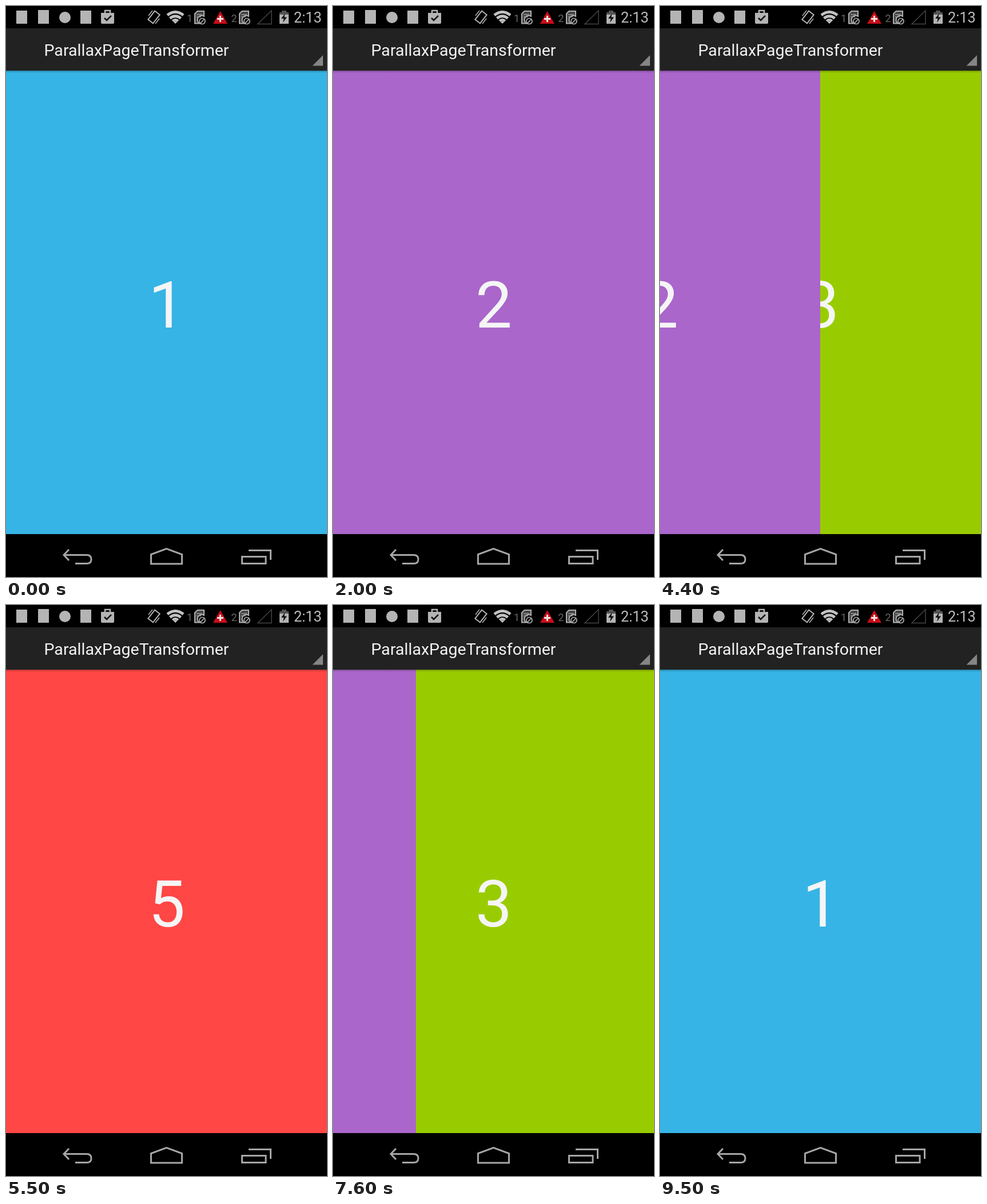
Recreate the animation shown at these times as an HTML page. Size 561x998 px, loop 9700 ms.

```html
<!DOCTYPE html>
<html lang="en">
<head>
<meta charset="utf-8">
<title>Parallax pager</title>
<style>
html, body { margin: 0; width: 100%; height: 100%; overflow: hidden; background: #000; }
svg { display: block; }
text { font-family: Roboto, "Open Sans", sans-serif; }
.digit { font-size: 114px; fill: #f5f5f5; text-anchor: middle; }
.line { fill: none; stroke: #a6a6a6; stroke-width: 3; }
</style>
</head>
<body>
<svg id="stage" width="561" height="998" viewBox="0 0 561 998">
  <defs>
    <linearGradient id="shade" x2="0" y2="1">
      <stop stop-opacity=".25"/>
      <stop offset="1" stop-opacity="0"/>
    </linearGradient>
    <g id="sim">
      <path d="M5.500 1H17V10A7 7 0 0 0 9 22.500H1V5.500Z" fill="#444" stroke="#b0b0b0" stroke-width="2"/>
      <path d="M4 7H14M4 11H12" stroke="#999" stroke-width="1.500"/>
      <circle cx="14" cy="18.500" r="5" fill="#000" stroke="#b0b0b0" stroke-width="1.700"/>
      <path d="M11 22L17.500 15" stroke="#b0b0b0" stroke-width="1.700"/>
    </g>
  </defs>
  <rect width="561" height="998"/>
  <g id="pages"></g>

  <!-- action bar -->
  <rect y="39" width="561" height="74" fill="#222"/>
  <rect y="113" width="561" height="4" fill="url(#shade)"/>
  <text x="66.500" y="87" font-size="28.550" fill="#f3f3f3">ParallaxPageTransformer</text>
  <path d="M554 86V104.500H535.500Z" fill="#858585"/>

  <!-- status bar -->
  <g fill="#b4b4b4">
    <rect x="18" y="8" width="19" height="23"/>
    <rect x="56" y="7" width="19" height="24"/>
    <circle cx="103" cy="20" r="10"/>
    <rect x="130" y="8" width="19" height="23"/>
    <path d="M166 12H189V29Q189 31 187 31H168Q166 31 166 29Z"/>
    <path d="M173 12V8H182V12" fill="none" stroke="#b4b4b4" stroke-width="2.500"/>
    <path d="M172 21L176 25L184 17" fill="none" stroke="#111" stroke-width="2.500"/>
  </g>
  <g fill="none" stroke="#b4b4b4">
    <rect x="253" y="10" width="11" height="19" transform="rotate(38 258.500 19.500)" stroke-width="2"/>
    <path d="M249 17L256 8M261 31L268 22" stroke-width="1.500"/>
    <g stroke-width="4.800" stroke="#c2c2c2">
      <path d="M282 16Q296 5 310 16M286.500 21.500Q296 14 305.500 21.500"/>
      <path d="M291 26Q296 22 301 26" stroke-width="4"/>
    </g>
    <path d="M464 8V31.500H440Z" stroke="#444" stroke-width="1.500"/>
  </g>
  <path d="M292.500 27.500Q296 25 299.500 27.500L296 31Z" fill="#c2c2c2"/>
  <g font-size="18" fill="#686868">
    <text x="316" y="28">1</text>
    <text x="393.500" y="28">2</text>
  </g>
  <use href="#sim" x="329" y="8"/>
  <use href="#sim" x="407" y="8"/>
  <path d="M374.500 9L387 31H362Z" fill="#c60d18"/>
  <path d="M374.500 17V28M369 22.500H380" stroke="#f0e4e4" stroke-width="3"/>
  <path d="M482 8H490V11H494V15H478V11H482Z" fill="#555"/>
  <path d="M478 15H494V31H478Z" fill="#b4b4b4"/>
  <path d="M487.500 13L481 22H485.500L484 29L491 19.500H486.500Z" fill="#111"/>
  <text x="503" y="28.500" font-size="25.300" fill="#bcbcbc">2:13</text>

  <!-- navigation bar -->
  <rect y="923" width="561" height="75"/>
  <g class="line">
    <path d="M110 950L101 959.500L110 969M101 959.500H141Q149 959.500 149 967Q149 974.500 141 974.500H121"/>
    <path d="M253.500 975V958.500L280.500 948.500L307.500 958.500V975Z"/>
    <path d="M412.500 962.500H454V974.500H412.500ZM424 951.500H462.500V968"/>
  </g>
</svg>
<script>
const W = 561, LOOP = 9700, STEP = 100;
const colors = ["#36b4e5", "#aa66cb", "#99cc00", "#ffbb33", "#ff4745"];

// start ms, end ms, page left, page reached
const swipes = [
  [1200, 1812, 0, 1],
  [4200, 4600, 1, 2],
  [5500, 5500, 4, 4],
  [6200, 6900, 4, 3],
  [7100, 7500, 3, 2],
  [7500, 7800, 2, 1],
  [7800, 8395, 1, 0]
];

const pagesBox = document.getElementById("pages");
pagesBox.innerHTML = colors.map((color, i) =>
  `<svg y="113" width="${W}" height="810">
    <rect width="${W}" height="810" fill="${color}"/>
    <text class="digit" x="281" y="449">${i + 1}</text>
  </svg>`).join("");
const pages = [...pagesBox.children];
const digits = pages.map(page => page.querySelector("text"));

const smooth = u => u * u * (3 - 2 * u);

function scrollAt(t) {
  let pos = 0;
  for (const [start, end, from, to] of swipes) {
    if (t < start) break;
    const u = t >= end ? 1 : (t - start) / (end - start);
    pos = from + (to - from) * smooth(u);
  }
  return pos;
}

function draw(t) {
  const scroll = Math.round(scrollAt(t) * W);
  pages.forEach((page, i) => {
    const x = i * W - scroll;
    page.setAttribute("x", x);
    page.style.display = Math.abs(x) < W ? "" : "none";
    // An incoming digit holds the centre while its page uncovers it.
    digits[i].setAttribute("x", 281 - Math.min(Math.max(x, 0), 280));
  });
}

const begin = performance.now();
function tick() {
  const t = (performance.now() - begin) % LOOP;
  draw(Math.floor(t / STEP) * STEP);
  requestAnimationFrame(tick);
}
tick();
</script>
</body>
</html>
```
